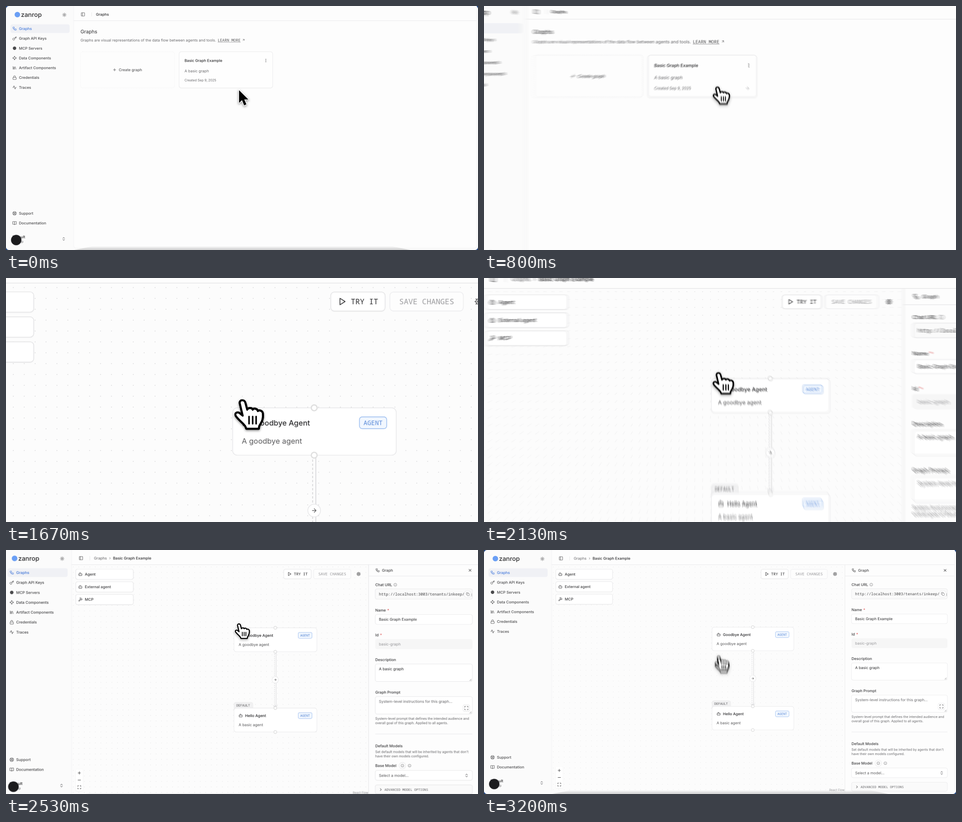
Animation of 1039 by 539 pixels, one loop 3.27 s. Source, as an HTML page with a canvas:

```html
<!DOCTYPE html>
<html lang="en">
<head>
<meta charset="utf-8">
<title>Graph editor walkthrough</title>
<style>
html, body { margin: 0; width: 100%; height: 100%; overflow: hidden; background: #fdfdfd; }
canvas { display: block; }
</style>
</head>
<body>
<canvas id="stage" width="1039" height="539"></canvas>
<script>
const W = 1039, H = 539, LOOP = 3270;
const SANS = 'Inter, sans-serif', MONO = '"Noto Sans Mono", monospace';
const INK = '#2b2b2d', GREY = '#68686b', PALE = '#9a9a9d', LINE = '#e6e6e8', BLUE = '#4379dc';

// Icons are drawn on a 24 unit grid.
const ring = (x, y, r) => `M${x - r} ${y}a${r} ${r} 0 1 0 ${2 * r} 0a${r} ${r} 0 1 0 ${-2 * r} 0`;
const frame = (x, y, w, h) =>
  `M${x + 2} ${y}h${w - 4}a2 2 0 0 1 2 2v${h - 4}a2 2 0 0 1-2 2h${4 - w}a2 2 0 0 1-2-2v${4 - h}a2 2 0 0 1 2-2z`;
const rays = (a, b) => Array.from({ length: 8 }, (_, i) => {
  const c = Math.cos(i * Math.PI / 4), s = Math.sin(i * Math.PI / 4);
  return `M${12 + a * c} ${12 + a * s}L${12 + b * c} ${12 + b * s}`;
}).join('');
const ICONS = {
  graph: frame(3, 3, 8, 8) + frame(13, 13, 8, 8) + 'M7 11v4a2 2 0 0 0 2 2h4',
  key: ring(7.5, 15.5, 5.5) + 'M21 2l-9.6 9.6M15.5 7.5l3 3L22 7l-3-3',
  parts: 'M12 2l3 3-3 3-3-3zM19 9l3 3-3 3-3-3zM5 9l3 3-3 3-3-3zM12 16l3 3-3 3-3-3z',
  library: 'M16 6l4 14M12 6v14M8 8v12M4 4v16',
  lock: frame(3, 11, 18, 11) + 'M7 11V7a5 5 0 0 1 10 0v4',
  pulse: 'M22 12h-4l-3 9L9 3l-3 9H2',
  buoy: ring(12, 12, 10) + ring(12, 12, 4) + 'M5 5l4 4M15 15l4 4M19 5l-4 4M9 15l-4 4',
  book: 'M12 7v14M3 18a1 1 0 0 1-1-1V4a1 1 0 0 1 1-1h5a4 4 0 0 1 4 4 4 4 0 0 1 4-4h5a1 1 0 0 1 1 1v13a1 1 0 0 1-1 1h-6a3 3 0 0 0-3 3 3 3 0 0 0-3-3z',
  updown: 'M7 15l5 5 5-5M7 9l5-5 5 5',
  sun: ring(12, 12, 4) + rays(8, 10.5),
  gear: ring(12, 12, 3) + ring(12, 12, 7.5) + rays(7.5, 10.5),
  panel: frame(3, 3, 18, 18) + 'M9 3v18',
  bot: frame(4, 8, 16, 12) + 'M12 8V4H8M2 14h2M20 14h2M15 13v2M9 13v2',
  hammer: 'M15 12l-8.4 8.4a2 2 0 0 1-3-3L12 9M18 15l4-4-3-3V7l-2.3-2.3A6 6 0 0 0 12.5 3H9l.9.8A6.2 6.2 0 0 1 12 8.4V10l2 2h1.2z',
  play: 'M6 3l14 9-14 9z',
  copy: frame(8, 8, 14, 14) + 'M4 16a2 2 0 0 1-2-2V4a2 2 0 0 1 2-2h10a2 2 0 0 1 2 2',
  expand: 'M8 3H3v5M16 3h5v5M3 16v5h5M21 16v5h-5',
  info: ring(12, 12, 10) + 'M12 16v-4M12 8v.1',
  close: 'M18 6L6 18M6 6l12 12',
  plus: 'M5 12h14M12 5v14',
  minus: 'M5 12h14',
  right: 'M5 12h14M12 5l7 7-7 7',
  upright: 'M7 7h10v10M7 17L17 7',
  chevron: 'M9 18l6-6-6-6',
  dots: ring(12, 5, 1) + ring(12, 12, 1) + ring(12, 19, 1),
};
for (const name in ICONS) ICONS[name] = new Path2D(ICONS[name]);

const HAND = new Path2D('M-3.2 3C-4-1.2 2-1.8 3 2.5L5 10C6 7.5 10.5 7.5 11 10C12 8 16 8.5 16.7 11.5C18 10 21.8 11 22.2 14C23 21 20.4 24 18.2 28L17.7 31H4L3 28.5C1 25-4 22-7.5 17C-9.5 13.5-5.5 11.5-2.5 14.5L0 16.5z');
const HAND_LINES = new Path2D('M7 17.5v8M11 17.5v8M14.8 17.5v8');
const ARROW = new Path2D('M0 0V28L6.5 22L11.2 33.5L16.2 31.3L11.5 20.5H20.5z');

function makeCanvas(scale) {
  const c = document.createElement('canvas');
  c.width = W * scale;
  c.height = H * scale;
  const ctx = c.getContext('2d');
  ctx.scale(scale, scale);
  ctx.imageSmoothingQuality = 'high';
  return ctx;
}

let g; // context that the helpers below draw on

// y is the middle of the capital letters
function text(str, x, y, { size = 8.22, color = INK, weight = 400, font = SANS } = {}) {
  g.font = `${weight} ${size}px ${font}`;
  g.fillStyle = color;
  g.fillText(str, x, y + size * 0.36);
}
const label = (str, x, y, color = INK) => text(str, x, y, { weight: 500, color });
const mono = (str, x, y, color = INK, size = 8.4, weight = 500) => text(str, x, y, { font: MONO, color, size, weight });
const small = (str, x, y) => text(str, x, y, { size: 7.15, color: GREY });

function box(x, y, w, h, r, fill, stroke, shadow) {
  g.save();
  g.beginPath();
  g.roundRect(x, y, w, h, r);
  if (shadow) { g.shadowColor = 'rgba(0,0,0,.07)'; g.shadowBlur = 3; g.shadowOffsetY = 1; }
  if (fill) { g.fillStyle = fill; g.fill(); }
  g.shadowColor = 'transparent';
  if (stroke) { g.strokeStyle = stroke; g.lineWidth = 0.7; g.stroke(); }
  g.restore();
}
function line(x1, y1, x2, y2, color = LINE, width = 0.8, dash = []) {
  g.beginPath();
  g.moveTo(x1, y1);
  g.lineTo(x2, y2);
  g.strokeStyle = color;
  g.lineWidth = width;
  g.setLineDash(dash);
  g.stroke();
  g.setLineDash([]);
}
function disc(x, y, r, fill, stroke, width = 1) {
  g.beginPath();
  g.arc(x, y, r, 0, 7);
  g.fillStyle = fill;
  g.fill();
  if (stroke) { g.strokeStyle = stroke; g.lineWidth = width; g.stroke(); }
}
function icon(name, x, y, color = '#4a4a4c', size = 9.6) {
  g.save();
  g.translate(x - size / 2, y - size / 2);
  g.scale(size / 24, size / 24);
  g.strokeStyle = color;
  g.lineWidth = 2;
  g.lineCap = g.lineJoin = 'round';
  g.stroke(ICONS[name]);
  g.restore();
}

function drawShell() {
  g.fillStyle = '#1d4280';
  g.fillRect(0, 0, W, H);
  box(0, 0, W, H, 7, '#fbfbfb');
  box(149, -8, 887, 543, 6, '#fdfdfd', '#f1f1f2');
  line(149, 32.6, 1036, 32.6);

  disc(25, 19, 6, '#6a9ff5');
  text('zanrop', 33, 19, { size: 13.8, weight: 500 });
  icon('sun', 128.5, 19.5);
  box(10, 40.5, 130, 19, 4, '#f0f1f5');
  const menu = [['graph', 'Graphs'], ['key', 'Graph API Keys'], ['', 'MCP Servers'], ['parts', 'Data Components'],
    ['library', 'Artifact Components'], ['lock', 'Credentials'], ['pulse', 'Traces']];
  menu.forEach(([name, title], i) => {
    const y = 50 + i * 21.65, color = i ? '#4a4a4c' : BLUE;
    if (name) icon(name, 18.8, y, color);
    else disc(18.8, y, 3.8, color);
    label(title, 28.5, y, color);
  });
  icon('buoy', 18.8, 458);
  label('Support', 28.5, 458, '#4a4a4c');
  icon('book', 18.8, 479.7);
  label('Documentation', 28.5, 479.7, '#4a4a4c');
  label('Default', 14, 510);
  small('zanrop', 15, 520.5);
  icon('updown', 127, 514.5, GREY);
  disc(22.5, 517, 11.3, '#1c1c1e', '#55555a', 0.7);

  icon('panel', 169.4, 18.5);
  line(188.5, 14, 188.5, 23);
}

function drawBottomShade() {
  const fade = g.createLinearGradient(0, 530, 0, H);
  fade.addColorStop(0, 'rgba(0,0,0,0)');
  fade.addColorStop(1, 'rgba(0,0,0,.17)');
  g.fillStyle = fade;
  g.beginPath();
  g.moveTo(150, H);
  g.lineTo(190, 531);
  g.lineTo(850, 531);
  g.lineTo(890, H);
  g.fill();
}

function drawList() {
  drawShell();
  label('Graphs', 198, 18.5);
  text('Graphs', 164, 56.5, { size: 10.8 });
  text('Graphs are visual representations of the data flow between agents and tools.', 164, 75.5, { color: GREY });
  mono('LEARN MORE', 466, 75.5, '#58585a', 8.4, 400);
  line(466, 80, 516.4, 80, '#58585a', 0.6);
  icon('upright', 523, 75, GREY, 7.5);

  g.setLineDash([2, 1.5]);
  box(164, 101, 207, 80, 5, null, '#f0f0f1');
  g.setLineDash([]);
  icon('plus', 239, 141);
  label('Create graph', 248.2, 141, '#5a5a5c');

  box(381, 101, 206, 80, 5, '#fefefe', LINE, true);
  label('Basic Graph Example', 393, 120.5);
  icon('dots', 572, 120.5);
  text('A basic graph', 393, 143.3, { color: GREY });
  small('Created Sep 9, 2025', 393, 164);
  drawBottomShade();
}

function drawNode(y, title, note) {
  box(502, y, 180, 52.3, 5, '#fff', LINE);
  icon('bot', 516.5, y + 16.5);
  label(title, 526, y + 16.5);
  text(note, 512, y + 36.5, { color: '#58585a' });
  box(641.5, y + 10, 30, 13, 3, '#f1f7ff', '#93b8ee');
  mono('AGENT', 646, y + 16.5, '#5a8ad8', 7);
  for (const end of [y, y + 52.3]) disc(591.7, end, 3.2, '#fff', '#dedede', 1.3);
}

function field(title, y, value, h, { required, fill = '#fff', stroke = LINE, color = INK } = {}) {
  label(title, 809, y, '#3c3c3e');
  if (required) text('*', 809 + g.measureText(title).width + 3, y, { color: '#e04848' });
  box(809, y + 9.3, 211, h, 4, fill, stroke);
  text(value, 817, y + 20.2, { color });
}

function drawPanel() {
  g.fillStyle = '#fdfdfd';
  g.fillRect(794.5, 33, 241, 502);
  line(794.5, 33, 794.5, 535);
  icon('graph', 814, 45);
  label('Graph', 823.5, 45, '#4a4a4c');
  icon('close', 1015, 45, INK);
  line(795, 57.5, 1035, 57.5);

  label('Chat URL', 809, 76.5, '#3c3c3e');
  icon('info', 852.5, 76.5, GREY, 7.5);
  box(809, 85.5, 211, 22.5, 4, '#fafafa', LINE);
  g.save();
  g.beginPath();
  g.rect(809, 85, 210, 24);
  g.clip();
  mono('http://localhost:3003/tenants/inkeep/graphs', 817, 97, '#48484a', 8.4, 400);
  g.restore();
  box(1002.5, 90, 14.5, 14, 5, '#fff', LINE);
  icon('copy', 1010, 97, GREY, 7.8);

  field('Name', 132, 'Basic Graph Example', 21.5, { required: true });
  field('Id', 186, 'basic-graph', 21.5, { required: true, fill: '#f6f6f6', stroke: null, color: PALE });
  field('Description', 240, 'A basic graph', 38.3);
  field('Graph Prompt', 311, 'System-level instructions for this graph...', 38.3, { color: GREY });
  for (const y of [286, 357]) {
    line(1014, y, 1018, y - 4, PALE, 0.6);
    line(1016.5, y, 1018, y - 1.5, PALE, 0.6);
  }
  box(1000, 338.5, 14, 14, 3, '#fff', LINE, true);
  icon('expand', 1007, 345.5);
  small('System-level prompt that defines the intended audience and', 809, 368.5);
  small('overall goal of this graph. Applied to all agents.', 809, 378);
  line(809, 402, 1020, 402);
  label('Default Models', 809, 427.8, '#3c3c3e');
  small("Set default models that will be inherited by agents that don't", 809, 441);
  small('have their own models configured.', 809, 450.5);
  label('Base Model', 809, 471, '#3c3c3e');
  disc(868, 471, 7, '#fcfcfc', LINE, 0.7);
  icon('info', 868, 471, GREY, 7.2);
  icon('info', 883.5, 471, GREY, 7.2);
  box(809, 481.5, 211, 21.5, 4, '#fff', LINE);
  text('Select a model...', 817, 492.5, { color: '#58585a' });
  icon('updown', 1007.5, 492.5, GREY);
  box(809, 513, 211, 20, 4, '#fafafa', LINE);
  icon('chevron', 821, 523.3);
  mono('ADVANCED MODEL OPTIONS', 829, 523.3, GREY, 7.2, 400);
}

function drawEditor() {
  drawShell();
  text('Graphs', 197.5, 18.5, { color: GREY });
  icon('chevron', 232.3, 18.7, GREY, 7.5);
  label('Basic Graph Example', 239, 18.5);

  g.fillStyle = '#fcfcfc';
  g.fillRect(149.5, 33, 645, 502);
  g.fillStyle = '#d2d2d4';
  for (let x = 152.6; x < 794; x += 12)
    for (let y = 37.6; y < 535; y += 12) g.fillRect(x - 0.4, y - 0.4, 0.8, 0.8);

  [['bot', 'Agent'], ['bot', 'External agent'], ['hammer', 'MCP']].forEach(([name, title], i) => {
    const y = 53.5 + i * 27.6;
    box(158, y - 11.2, 125, 22.4, 4, '#fff', '#e2e2e4', true);
    icon(name, 168, y);
    label(title, 177.8, y, '#3c3c3e');
  });
  box(610, 42.5, 59.7, 21, 4, '#fff', '#e2e2e4', true);
  icon('play', 622.5, 53, INK);
  mono('TRY IT', 632, 53);
  box(675, 42.5, 80.8, 21, 4, '#fdfdfd', '#ececee');
  mono('SAVE CHANGES', 685.3, 53, PALE);
  icon('gear', 772.7, 53);

  line(590, 223, 590, 343, '#dadadc', 1, [2.5, 2]);
  line(593.5, 223, 593.5, 343, '#dcdcde', 1);
  for (const x of [590, 593.5]) {
    line(x - 3, 339.5, x, 343, '#dcdcde');
    line(x + 3, 339.5, x, 343, '#dcdcde');
  }
  box(502, 333, 41, 16, [4, 4, 0, 0], '#f1f1f2', '#ebebec');
  mono('DEFAULT', 507, 339.4, '#5c5c5e', 7.1);
  drawNode(170.4, 'Goodbye Agent', 'A goodbye agent');
  drawNode(345.4, 'Hello Agent', 'A basic agent');
  disc(591.7, 283.8, 7, '#fff', '#e4e4e6', 0.7);
  icon('right', 591.7, 283.8, '#4a4a4c', 7.2);

  box(158, 479, 15.5, 47, 2, '#fff', null, true);
  icon('plus', 165.7, 487, INK, 10);
  icon('minus', 165.7, 502.4, INK, 10);
  icon('expand', 165.7, 518.3, INK, 9);
  text('React Flow', 760, 530, { size: 6.5, color: PALE });
  drawPanel();
  drawBottomShade();
}

function render(draw) {
  g = makeCanvas(2);
  draw();
  return g.canvas;
}
const listPage = render(drawList), editorPage = render(drawEditor);

const clamp = v => Math.min(1, Math.max(0, v));
const smooth = v => (v = clamp(v)) * v * (3 - 2 * v);

// Slightly underdamped spring: mass 2.25, tension 200, friction 40
function spring(ms) {
  if (ms <= 0) return 0;
  const t = ms / 1000, d = 8.89, w = 3.14;
  return 1 - Math.exp(-d * t) * (Math.cos(w * t) + d / w * Math.sin(w * t));
}
const FOCUS = { x: 505, y: 54 };
const zoomAt = t => 1 + spring(t - 726) - spring(t - 1940);

function drawCursor(t) {
  const leave = Math.max(0, (t - 2970) / 230) ** 3;
  const x = 513 + 4 * leave, y = 186 - 23.5 * smooth((t - 450) / 250) + 75 * leave;
  const press = 1 - 0.07 * smooth((t - 1030) / 80) * smooth((1260 - t) / 80);
  const pointing = t > 450 && y < 181 || t > 1000;
  g.save();
  g.translate(x, y);
  g.scale(press, press);
  g.lineJoin = g.lineCap = 'round';
  g.shadowColor = 'rgba(0,0,0,.5)';
  g.shadowBlur = 5;
  g.shadowOffsetY = 2;
  g.strokeStyle = pointing ? '#000' : '#fff';
  g.lineWidth = pointing ? 2.2 : 2.6;
  const shape = pointing ? HAND : ARROW;
  g.stroke(shape);
  g.shadowColor = 'transparent';
  g.fillStyle = pointing ? '#fff' : '#000';
  g.fill(shape);
  if (pointing) {
    g.stroke(shape);
    g.lineWidth = 1.7;
    g.stroke(HAND_LINES);
  }
  g.restore();
}

function drawScene(t) {
  const zoom = zoomAt(t), editing = t >= 1330;
  g.save();
  g.translate(FOCUS.x * (1 - zoom), FOCUS.y * (1 - zoom));
  g.scale(zoom, zoom);
  g.drawImage(editing ? editorPage : listPage, 0, 0, W, H);
  if (!editing) {
    g.globalAlpha = smooth((t - 560) / 300);
    icon('right', 569.5, 164, '#b2b2b5');
    g.globalAlpha = 1;
  }
  drawCursor(t);
  g.restore();
}

const stage = document.getElementById('stage').getContext('2d');
const layer = makeCanvas(1);
const SHUTTER = 10, LAST_MOVE = 3200;
const start = performance.now();

// Motion blur: average several moments inside the shutter time
function tick() {
  const t = Math.min(LAST_MOVE, (performance.now() - start) % LOOP);
  const moving = Math.abs(zoomAt(t + 8) - zoomAt(t - 8)) > 0.001 || t > 2970 || t > 450 && t < 700;
  const samples = moving ? 10 : 1;
  g = layer;
  for (let i = 0; i < samples; i++) {
    drawScene(moving ? t + SHUTTER * (i / (samples - 1) - 0.5) : t);
    stage.globalAlpha = 1 / (i + 1);
    stage.drawImage(layer.canvas, 0, 0);
  }
  requestAnimationFrame(tick);
}
tick();
</script>
</body>
</html>
```
